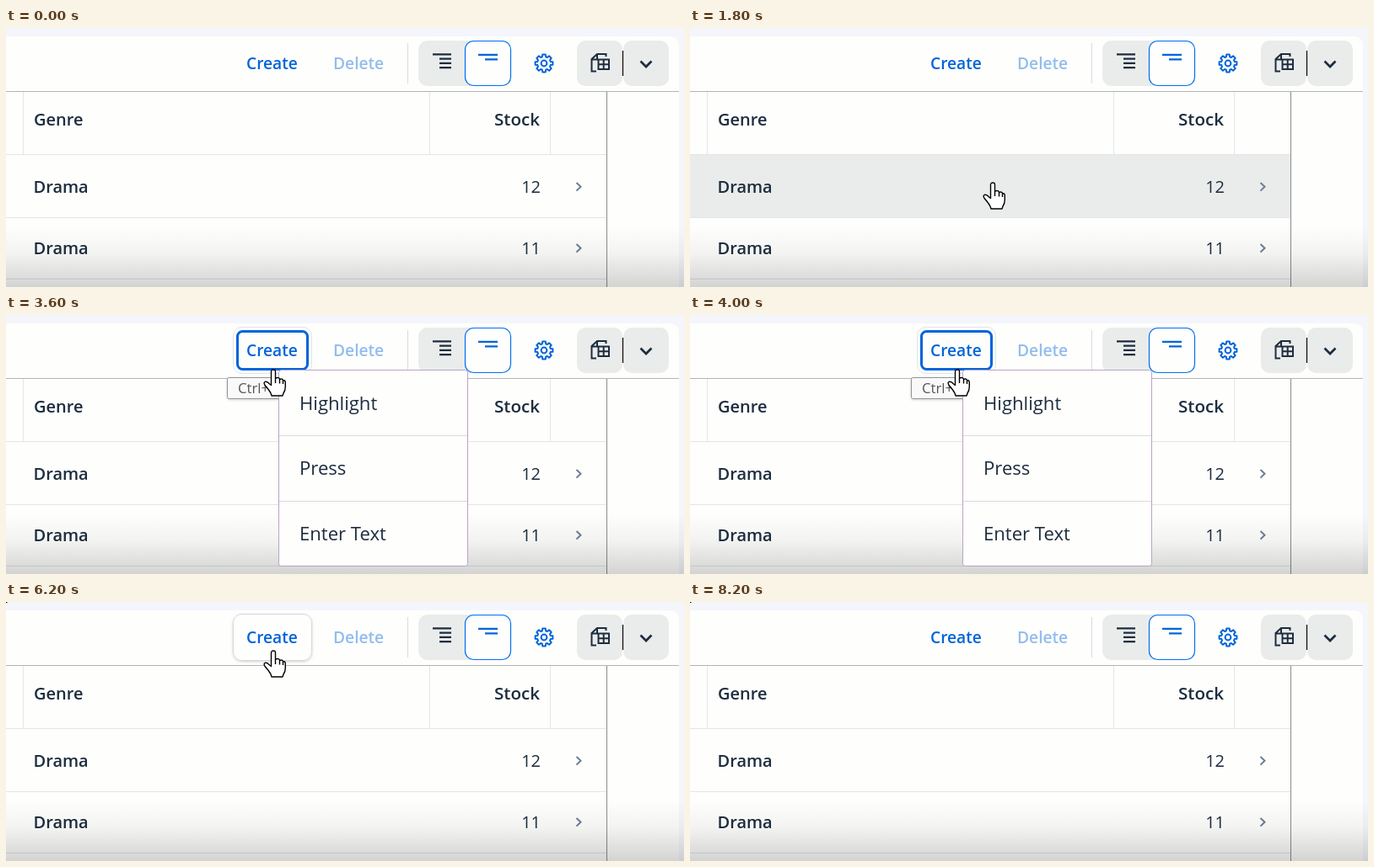
Recreate the animation shown at these times as an HTML page. Size 804 by 308 pixels, loop 8.4 s.

```html
<!DOCTYPE html>
<html lang="en">
<head>
<meta charset="utf-8">
<title>Recording actions on a table</title>
<style>
  html, body { margin: 0; width: 100%; height: 100%; overflow: hidden; background: #f5f6fb; }
  svg { display: block; font-family: "Open Sans", "Noto Sans", sans-serif; fill: #1d2d3e; }
  .bold { font-weight: 600; font-size: 20px; }
  .button { font-weight: 600; font-size: 19.2px; fill: #0064d9; }
  .menu { font-size: 22.1px; }
  .line { fill: none; stroke: #e4e5e7; }
  .icon { fill: none; stroke: #1d2d3e; stroke-width: 2.3; }
  .blue { stroke: #0064d9; }
  .hover { fill: #eaecec; }
  .state { visibility: hidden; }
</style>
</head>
<body>
<svg width="804" height="308" viewBox="0 0 804 308">
  <defs>
    <linearGradient id="fade" x1="0" y1="0" x2="0" y2="1">
      <stop offset="0" stop-opacity="0"/>
      <stop offset=".45" stop-opacity=".045"/>
      <stop offset="1" stop-opacity=".17"/>
    </linearGradient>
    <filter id="shadow" x="-20%" y="-20%" width="140%" height="150%">
      <feDropShadow dx="0" dy="1" stdDeviation="1.5" flood-opacity=".18"/>
    </filter>
  </defs>

  <rect width="804" height="308" fill="#f5f6fb"/>
  <path d="M0 10H786Q798 10 798 22V308H0Z" fill="#fefefd"/>
  <rect id="mark" class="state" width="1.5" height="1" fill="#000"/>

  <!-- table -->
  <rect id="row1" class="state hover" y="151" width="712" height="74"/>
  <rect id="row2" class="state hover" y="226" width="712" height="72"/>
  <path class="line" d="M20.5 76V150M502.5 76V150M645.5 76V150M0 150.5H712M0 225.5H712M0 298.5H712"/>
  <path class="line" d="M0 75.5H798" style="stroke:#b2b4b6"/>
  <path class="line" d="M712.5 76V308" style="stroke:#8b8c8e"/>
  <g class="bold">
    <text x="33" y="116">Genre</text>
    <text x="633" y="116" text-anchor="end" font-size="20.6">Stock</text>
    <text x="32.5" y="196">Drama</text>
    <text x="32.5" y="269">Drama</text>
  </g>
  <g font-size="20" text-anchor="end">
    <text x="634" y="196">12</text>
    <text x="634" y="269">11</text>
  </g>
  <path class="icon" d="M676.5 184L681.5 188.8L676.5 193.6M676.5 257L681.5 261.8L676.5 266.6" style="stroke:#6b7f94;stroke-width:2"/>
  <rect y="236" width="804" height="72" fill="url(#fade)"/>

  <!-- toolbar -->
  <rect id="over" class="state" x="269.5" y="14.5" width="93" height="55" rx="10" fill="#fefefd" stroke="#d5d8dc" filter="url(#shadow)"/>
  <g id="focus" class="state" fill="#fefefd">
    <rect x="269.5" y="14.5" width="93" height="55" rx="10" stroke="#e0e3e8"/>
    <rect x="274.5" y="19.5" width="83" height="45" rx="6" stroke="#0064d9" stroke-width="3"/>
  </g>
  <text class="button" x="285" y="49">Create</text>
  <text class="button" x="388" y="49" opacity=".42" font-size="19">Delete</text>
  <path class="line" d="M476.5 18V66" style="stroke:#d9dadc"/>

  <rect x="489" y="15" width="110" height="54" rx="11" fill="#eaecec"/>
  <rect x="544.5" y="15.5" width="54" height="53" rx="10" fill="#fefefd" stroke="#0070f2" stroke-width="1.2"/>
  <path class="icon" d="M506 31.3H528M514 36.6H528M514 41.9H528M514 47.2H528"/>
  <path class="icon blue" d="M560 31.8H583M568 37.3H583"/>
  <g class="icon blue" style="stroke-width:2;stroke-linejoin:round">
    <path id="gear"/>
    <circle cx="638" cy="42" r="3.4"/>
  </g>

  <rect x="677" y="15" width="54" height="54" rx="10" fill="#eaecec"/>
  <rect x="732" y="15" width="54" height="54" rx="10" fill="#eaecec"/>
  <path class="line" d="M731.5 27V57" style="stroke:#111;stroke-width:1.3"/>
  <g class="icon" style="stroke-width:2">
    <path d="M700 51.5H694.5V37L701 31H711.5V34M694.5 37.5H701V31"/>
    <path d="M702.5 37.5H715V49H702.5ZM702.5 43.2H715M708.7 37.5V49"/>
  </g>
  <path class="icon" d="M752.5 39.5L759 46L765.5 39.5" style="stroke-width:2.7"/>

  <!-- popups -->
  <g id="tip" class="state">
    <rect x="262.5" y="74.5" width="90" height="25" rx="2" fill="#f9f9f9" stroke="#8f949b" filter="url(#shadow)"/>
    <text x="275" y="93" font-size="16.8" fill="#575757">Ctrl+Enter</text>
  </g>
  <g id="menu" class="state">
    <rect x="323.5" y="65.5" width="224" height="233" rx="3" fill="#fefefd" stroke="#b9a3c6"/>
    <rect id="item1" class="state" x="324" y="66" width="223" height="77" fill="#eaf4fc"/>
    <rect id="item2" class="state" x="324" y="144" width="223" height="77" fill="#eaf4fc"/>
    <path class="line" d="M324 143.5H547M324 221.5H547" style="stroke:#d9dadd"/>
    <g class="menu">
      <text x="348" y="113">Highlight</text>
      <text x="348" y="190">Press</text>
      <text x="348" y="268">Enter Text</text>
    </g>
  </g>

  <g id="hand" class="state" stroke="#000" stroke-width="1.4" stroke-linejoin="round">
    <path fill="#fff" d="M-2.5 2.5Q-2.5 0 0 0T2.5 2.5V10Q7 8.5 7.5 11.5Q11 10 11.5 13Q14.3 12 14.3 15.5V20Q14.3 25 12 28L11 31H-2L-3 28Q-5 24 -10 18.5Q-12 15 -9.5 14.3Q-7 14 -4.5 17L-2.5 18.5Z"/>
    <path fill="none" d="M2.5 10V16M7.5 11.5V16.5M11.5 13V17"/>
  </g>
</svg>
<script>
  const LOOP = 8400;
  const $ = id => document.getElementById(id);

  // start time, pointer x, pointer y, visible parts
  const steps = [
    [0, 0, 0, ''],
    [1400, 408, 286, 'hand row2'],
    [1600, 384, 240, 'hand row2'],
    [1800, 359, 184, 'hand row1'],
    [2000, 338, 120, 'hand'],
    [2200, 321, 78, 'hand'],
    [2400, 317, 58, 'hand over'],
    [2800, 317, 64, 'hand over'],
    [3000, 317, 65, 'hand focus'],
    [3200, 317, 65, 'hand focus menu'],
    [3400, 317, 65, 'hand focus menu tip'],
    [4800, 347, 125, 'hand menu item1 mark'],
    [5000, 373, 188, 'hand menu item2 mark'],
    [5400, 373, 188, 'hand mark'],
    [6000, 317, 58, 'hand over mark'],
    [7000, 317, 178, 'hand row1 mark'],
    [7200, 316, 279, 'hand row2 mark'],
    [7400, 0, 0, 'mark']
  ];
  const parts = [...document.querySelectorAll('.state')];

  function gearPath() {
    const point = (r, a) =>
      (638 + r * Math.sin(a)).toFixed(1) + ' ' + (42 - r * Math.cos(a)).toFixed(1);
    const teeth = [];
    for (let i = 0; i < 8; i++) {
      const a = i * Math.PI / 4;
      teeth.push(point(8, a - .27), point(10.6, a - .17), point(10.6, a + .17), point(8, a + .27));
    }
    return 'M' + teeth.join('L') + 'Z';
  }
  $('gear').setAttribute('d', gearPath());

  function draw(now) {
    const t = now % LOOP;
    const [, x, y, shown] = steps.findLast(step => step[0] <= t);
    const visible = shown.split(' ');
    for (const part of parts)
      part.style.visibility = visible.includes(part.id) ? 'visible' : 'hidden';
    $('hand').setAttribute('transform', `translate(${x} ${y})`);
    requestAnimationFrame(() => draw(performance.now()));
  }
  draw(performance.now());
</script>
</body>
</html>
```
